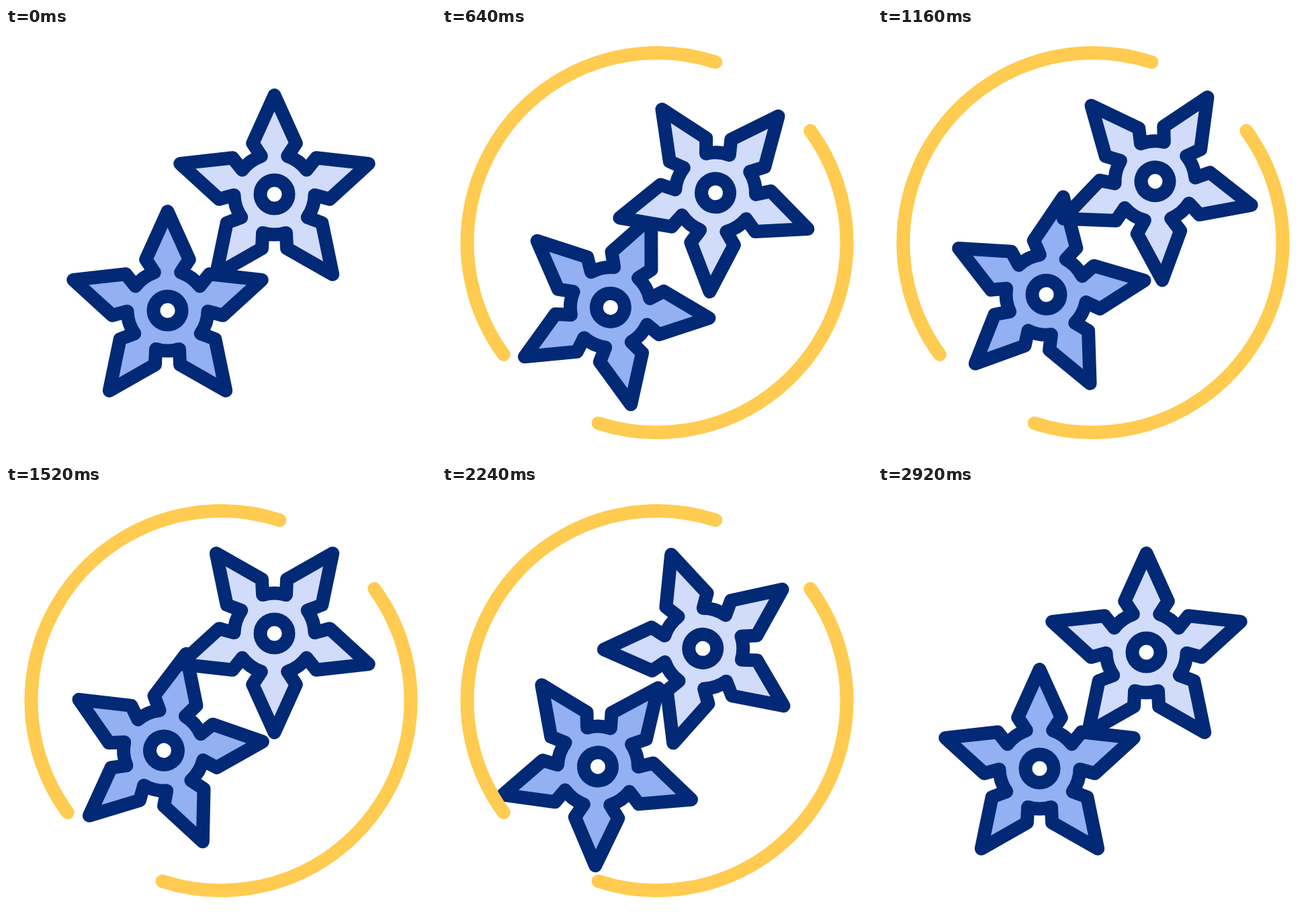
An HTML page with a canvas for the animation above (3000 ms loop, 640 by 640 pixels).

```html
<!DOCTYPE html>
<html lang="en">
<head>
<meta charset="utf-8">
<title>Spinning throwing stars</title>
<style>
  html, body { margin: 0; width: 100%; height: 100%; overflow: hidden; background: #fff; }
  canvas { display: block; width: 640px; height: 640px; }
</style>
</head>
<body>
<canvas id="stage" width="640" height="640"></canvas>
<script>
const ctx = document.getElementById('stage').getContext('2d');
const LOOP = 3000, STEP = 40;
const NAVY = '#022975', YELLOW = '#ffcb50';
const RAD = Math.PI / 180;

// Eased progress from 0 to 1 between two times
function ease(t, from, to) {
  const u = Math.min(1, Math.max(0, (t - from) / (to - from)));
  return u * u * (3 - 2 * u);
}

// Five blades around a hub, centred on the hub
function starPath() {
  const path = new Path2D();
  const hub = 60, half = 19.1 * RAD;
  for (let i = 0; i < 5; i++) {
    const a = i * 72 * RAD, c = Math.cos(a), s = Math.sin(a);
    const line = (x, y) => path.lineTo(x * c - y * s, x * s + y * c);
    const up = a - Math.PI / 2;
    line(-hub * Math.sin(half), -hub * Math.cos(half));
    line(-32.3, -76);
    line(0, -147.5);
    line(32.3, -76);
    path.arc(0, 0, hub, up + half, up + 72 * RAD - half);
  }
  path.closePath();
  return path;
}

const star = starPath();
const ring = new Path2D();
ring.arc(0, 0, 21, 0, 2 * Math.PI);

// The pivot lies 14 px above the hub
function drawStar(x, y, fill, turn) {
  ctx.save();
  ctx.translate(x, y - 14);
  ctx.rotate(-turn * 2 * Math.PI);
  ctx.translate(0, 14);
  ctx.strokeStyle = NAVY;
  ctx.fillStyle = fill;
  ctx.fill(star);
  ctx.stroke(star);
  ctx.fillStyle = '#fff';
  ctx.fill(ring);
  ctx.stroke(ring);
  ctx.restore();
}

// Visible part of a sweep, measured counterclockwise from its end
function drawSweep(end, head, tail) {
  if (head - tail < 0.0005) return;
  const span = 144.1;
  ctx.strokeStyle = YELLOW;
  ctx.beginPath();
  ctx.arc(320, 319.5, 282.5, (end - span * head) * RAD, (end - span * tail) * RAD);
  ctx.stroke();
}

function draw(t) {
  ctx.fillStyle = '#fff';
  ctx.fillRect(0, 0, 640, 640);
  ctx.lineWidth = 20;
  ctx.lineCap = ctx.lineJoin = 'round';
  drawStar(240.5, 420.5, '#92b0f2', ease(t, 0, 2800));
  drawStar(399.5, 247.5, '#d1dcfb', ease(t, 120, 2920));
  const head = ease(t, 40, 600), tail = ease(t, 2240, 2800);
  drawSweep(288, head, tail);
  drawSweep(108, head, tail);
}

function tick() {
  const t = performance.now() % LOOP;
  draw(Math.floor(t / STEP) * STEP);
  requestAnimationFrame(tick);
}
tick();
</script>
</body>
</html>
```
